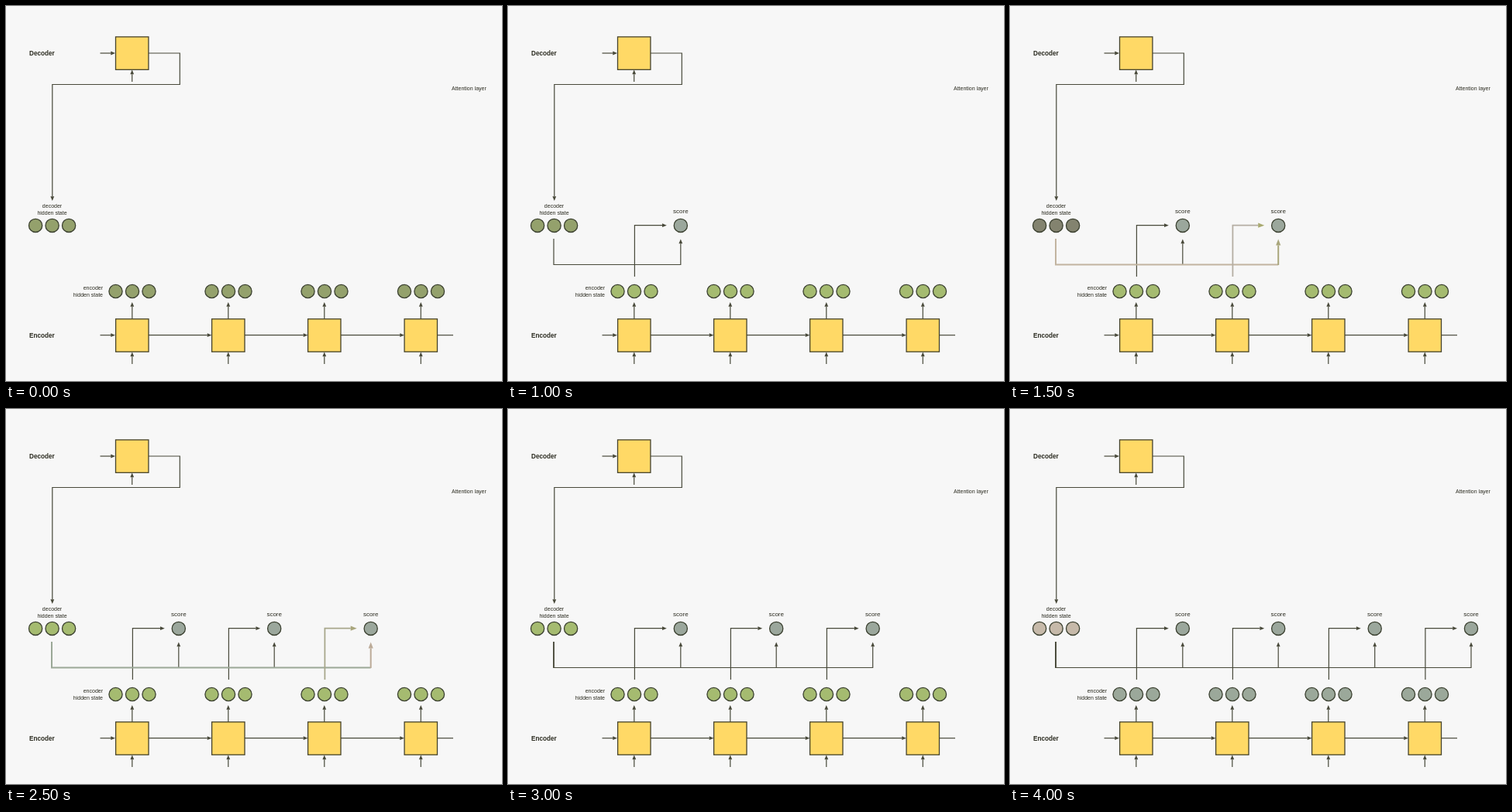
An HTML page that plays this animation: 640 px wide and 485 px high, repeating every 5000 ms.

```html
<!DOCTYPE html>
<html lang="en">
<head>
<meta charset="utf-8">
<title>Attention scores</title>
<style>
  html, body { margin: 0; width: 100%; height: 100%; overflow: hidden; background: #f7f7f7; }
  svg { display: block; width: 640px; height: 485px; }
  text { font: 7px "Liberation Sans", Arial, sans-serif; fill: #2b2b20; }
  .title { font-size: 8.2px; font-weight: bold; }
  .score { font-size: 8px; }
  .mid { text-anchor: middle; }
  .end { text-anchor: end; }
  .box { fill: #ffd966; stroke: #45432c; stroke-width: 1.3; }
  circle { stroke: #3b4030; stroke-width: 1.3; }
  .dec, .enc, .sc { animation: dec 5s step-end infinite; }
  .enc { animation-name: enc; }
  .sc { animation-name: sc; }
  @keyframes dec {
    0% { fill: #94a16c; }
    30% { fill: #83836f; }
    40%, 50% { fill: #a5bb70; }
    70%, 100% { fill: #c6b9a9; }
  }
  @keyframes enc {
    0% { fill: #94a16c; }
    10% { fill: #a5bb70; }
    70% { fill: #98a36c; }
    80%, 100% { fill: #9ba89a; }
  }
  @keyframes sc {
    0%, 10% { fill: #c6b9ad; }
    20%, 100% { fill: #9ba79c; }
  }
</style>
</head>
<body>
<svg id="stage" viewBox="0 0 640 485"></svg>
<script>
const stage = document.getElementById('stage');
const DARK = '#48493a';
const cells = [163, 287, 411, 535.5];
const scores = [222.8, 346.2, 470.7, 595];
const tints = [
  { up: '#aaaa9c', tip: '#a9aa70', base: '#a9a678', rise: '#a09c70' },
  { up: '#b5aea3', tip: '#a9aa70', base: '#c2b4a0', rise: '#a9a67c' },
  { up: '#a8a78c', tip: '#a9a67c', base: '#9ba897', rise: '#bcab98' },
  { up: '#a9a994', tip: '#a3a474', base: '#c4b6a6', rise: '#c4b6a6' }
];

function add(tag, attrs, parent = stage) {
  const el = document.createElementNS('http://www.w3.org/2000/svg', tag);
  for (const key in attrs) el.setAttribute(key, attrs[key]);
  parent.append(el);
  return el;
}

function line(points, parent, color = DARK, width = 1.2) {
  add('polyline', { points: points.join(' '), fill: 'none', stroke: color, 'stroke-width': width }, parent);
}

// Polyline whose last point is the tip of an arrowhead.
function arrow(points, parent, color = DARK, width = 1.2, tip = color) {
  const [[px, py], [x, y]] = points.slice(-2);
  const len = Math.hypot(x - px, y - py);
  const dx = (x - px) / len, dy = (y - py) / len;
  const size = width > 1.5 ? 8 : 5.8, half = width > 1.5 ? 3.1 : 2.4;
  const bx = x - dx * size, by = y - dy * size;
  line([...points.slice(0, -1), [bx, by]], parent, color, width);
  const head = [[x, y], [bx - dy * half, by + dx * half], [bx + dy * half, by - dx * half]];
  add('polygon', { points: head.join(' '), fill: tip }, parent);
}

function label(str, x, y, cls = '', parent) {
  add('text', { x, y, class: cls }, parent).textContent = str;
}

function dot(cx, cy, cls, parent) {
  add('circle', { cx, cy, r: 8.6, class: cls }, parent);
}

function trio(cx, cy, cls) {
  [-21.5, 0, 21.5].forEach(d => dot(cx + d, cy, cls));
}

function box(cx, y) {
  add('rect', { x: cx - 21.2, y, width: 42.4, height: 42.4, class: 'box' });
}

const rules = document.head.appendChild(document.createElement('style'));

// Group shown only between two percentages of the loop.
function timed(name, from, to = 100) {
  const off = to < 100 ? `${to}%, 100% { visibility: hidden }` : '100% { visibility: visible }';
  rules.append(`@keyframes ${name} { 0% { visibility: hidden } ${from}% { visibility: visible } ${off} }\n`);
  return add('g', { style: `animation: ${name} 5s step-end infinite` });
}

function link(i, group, lit) {
  const c = cells[i] + 0.4, s = scores[i], t = tints[i];
  const w = lit ? 2 : 1.2;
  const base = lit ? t.base : DARK;
  line([[59, 301], [59, 334.5], [s, 334.5]], group, base, lit && i === 3 ? 2.4 : w);
  arrow([[s, 335], [s, 301.5]], group, lit ? t.rise : DARK, w);
  arrow([[c, 350], [c, 283.7], [s - 18, 283.7]], group, lit ? t.up : DARK, lit ? 1.8 : w, lit ? t.tip : DARK);
}

// Decoder
label('Decoder', 30, 64, 'title');
label('Attention layer', 575, 109);
arrow([[121.5, 61], [141, 61]]);
arrow([[162.7, 98], [162.7, 82.5]]);
arrow([[184, 61], [224.3, 61], [224.3, 101.5], [59.8, 101.5], [59.8, 252]]);
box(162.7, 39.9);
label('decoder', 59.5, 261.3, 'mid');
label('hidden state', 59.5, 269.6, 'mid');
trio(59.6, 283.9, 'dec');

// Encoder
label('Encoder', 30, 429, 'title');
label('encoder', 125, 367.2, 'end');
label('hidden state', 125, 375.6, 'end');
arrow([[121.5, 425.7], [141, 425.7]]);
cells.forEach((x, i) => {
  if (i < 3) arrow([[x + 21, 425.7], [cells[i + 1] - 21.5, 425.7]]);
  else line([[x + 21, 425.7], [577, 425.7]]);
  arrow([[x - 0.2, 405], [x - 0.2, 383]]);
  arrow([[x - 0.2, 463], [x - 0.2, 447.5]]);
  box(x - 0.2, 404.8);
  trio(x, 369, 'enc');
});

// Each score arrives with a lit link, which then turns dark
cells.forEach((_, i) => link(i, timed('dark' + i, 20 + 20 * i), false));
cells.forEach((_, i) => link(i, timed('lit' + i, 10 + 20 * i, 20 + 20 * i), true));
scores.forEach((x, i) => {
  const g = timed('score' + i, 10 + 20 * i);
  label('score', x, 267.5, 'score mid', g);
  dot(x, 283.9, 'sc', g);
});
</script>
</body>
</html>
```
